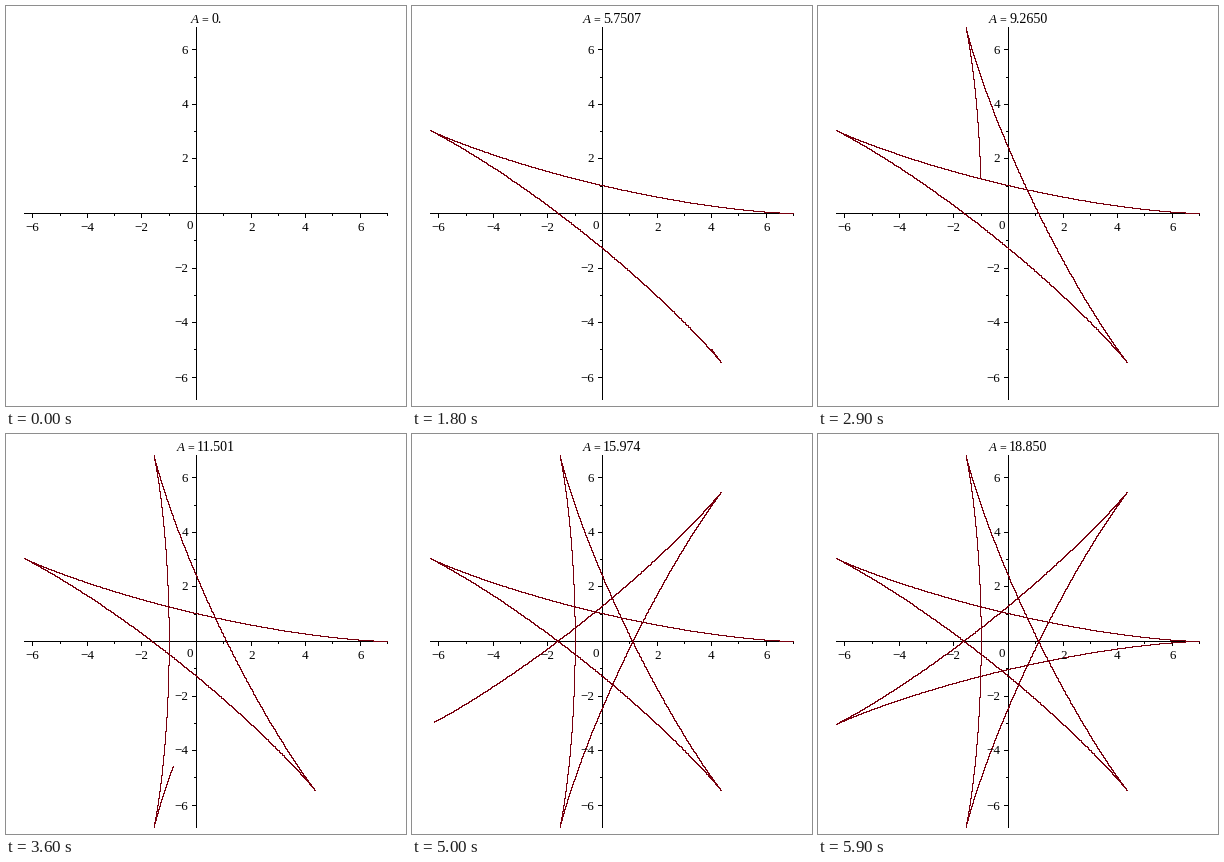
Write a matplotlib script that moves like this. It is 400 px wide and 400 px high and loops after 6 s.

```python
import numpy as np
import matplotlib.pyplot as plt
from matplotlib.animation import FuncAnimation

SIZE, DPI = 400, 100
FRAMES, INTERVAL = 60, 100
PX = 72 / DPI              # one pixel in points
UNIT = 27.28               # pixels per axis unit
X0, Y0 = 190, 207          # pixel of the origin
A_MAX = 6 * np.pi

plt.rcParams["font.family"] = "Liberation Serif"
plt.rcParams["path.simplify"] = False

fig = plt.figure(figsize=(SIZE / DPI, SIZE / DPI), dpi=DPI, facecolor="white")
ax = fig.add_axes([0, 0, 1, 1])
ax.set_xlim(0, SIZE)
ax.set_ylim(SIZE, 0)
ax.axis("off")


def to_px(x, y):
    """Nearest pixel to a point in axis units."""
    return np.round(X0 + UNIT * x), np.round(Y0 - UNIT * y)


def pixel_line(xs, ys, color, zorder):
    """Crisp line, one pixel wide, along the pixel grid."""
    line, = ax.plot(xs, ys, color=color, lw=PX, antialiased=False, snap=True,
                    drawstyle="steps-post", solid_capstyle="butt",
                    solid_joinstyle="miter", zorder=zorder)
    return line


def segment(x1, y1, x2, y2):
    pixel_line([x1, x2], [y1, y2], "black", 1)


def label(x, y, text, ha="center", size=13, **style):
    return ax.text(x, y, text, ha=ha, va="baseline", fontsize=size * PX,
                   color="black", zorder=3, **style)


def draw_axes():
    segment(18, Y0, 381, Y0)
    segment(X0, 21, X0, 393)
    for n in range(-6, 8):
        if n == 0:
            continue
        x, y = to_px(n, n)
        major = n % 2 == 0
        length = 4 if major else 2
        segment(x, Y0, x, Y0 + length)
        if n < 7:
            segment(X0 - length, y, X0, y)
        if major:
            text = str(n).replace("-", "\u2212")
            label(x + (0 if n < 0 else 0.5), 225, text)
            label(182, y + 4.5, text, ha="right")
    label(184, 223, "0")


def hypocycloid(t):
    """Rolling circle of radius 3 inside a circle of radius 7."""
    return (4 * np.cos(t) + 3 * np.cos(4 * t / 3),
            4 * np.sin(t) - 3 * np.sin(4 * t / 3))


draw_axes()
curve = pixel_line([], [], "#78000e", 2)
letter = label(0, 17, "A", ha="left", style="italic")
equals = label(0, 17, "=", size=12)
number = label(0, 17, "", ha="left", size=14)


def update(i):
    a = A_MAX * i / (FRAMES - 1)
    text = f"{a:#.5g}" if i else "0."
    left = 200 - (19 + 7 * (len(text) - 1) + 4) / 2
    letter.set_x(left)
    equals.set_x(left + 14)
    number.set_x(left + 20)
    number.set_text(text)
    if i:
        t = np.linspace(0, a, int(250 * a) + 2)
        curve.set_data(*to_px(*hypocycloid(t)))
    else:
        curve.set_data([], [])
    return curve, letter, equals, number


anim = FuncAnimation(fig, update, frames=FRAMES, interval=INTERVAL,
                     repeat=True, repeat_delay=0)
plt.show()
```
